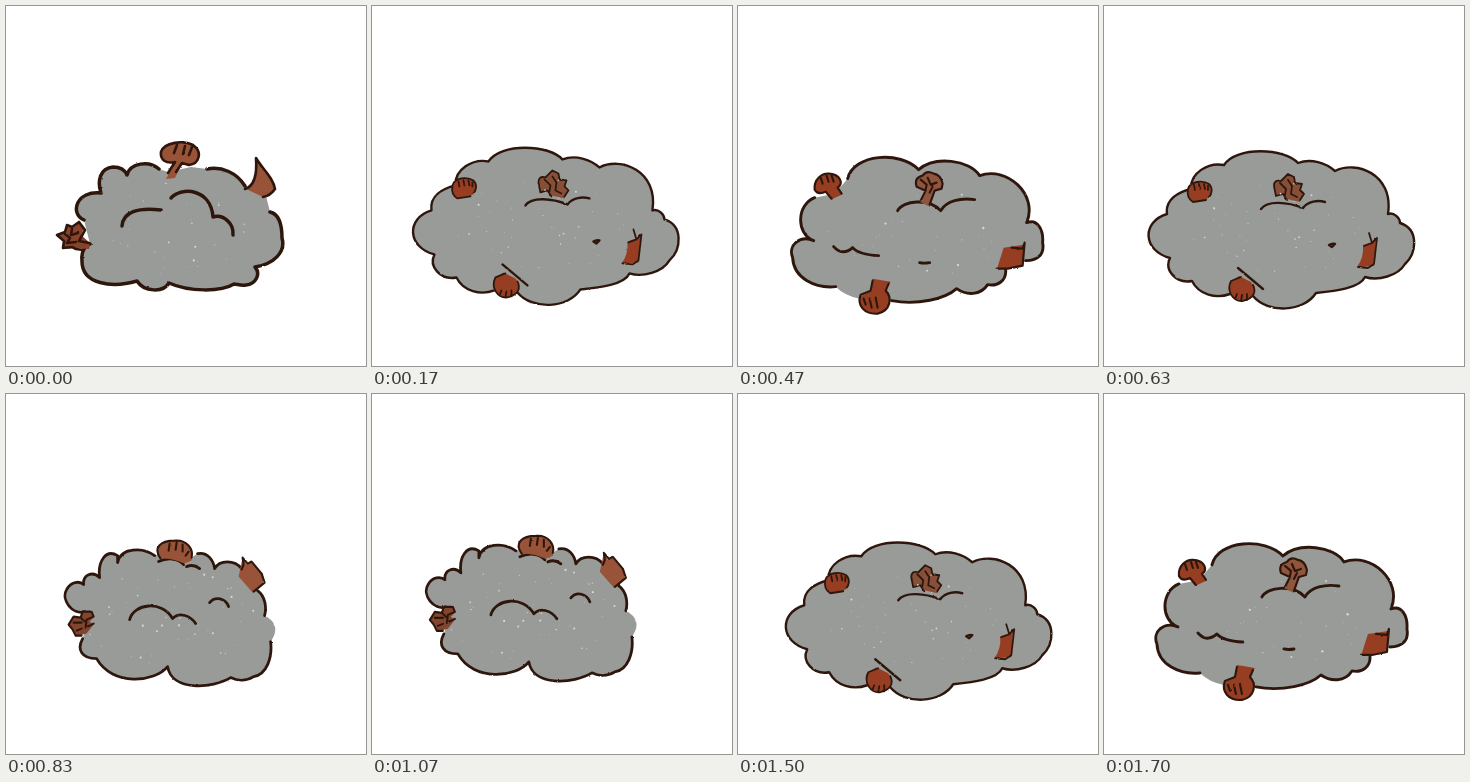
Animation, 360 px wide and 360 px high, one loop 1730 ms. Source, as an HTML page:

```html
<!DOCTYPE html>
<html lang="en">
<head>
<meta charset="utf-8">
<title>Scuffle cloud</title>
<style>
  html, body { margin: 0; width: 100%; height: 100%; overflow: hidden; background: #fff; }
  svg { display: block; width: 100vw; height: 100vh; }
  .ink { fill: none; stroke: #2f190f; stroke-linecap: round; stroke-linejoin: round; }
  .fog { fill: #989b98; }
  .dust { fill: #d5d9d6; }
</style>
</head>
<body>
<svg id="stage" viewBox="0 0 360 360">
  <filter id="rough" x="0" y="0" width="360" height="360" filterUnits="userSpaceOnUse">
    <feTurbulence type="fractalNoise" baseFrequency=".2" numOctaves="2" seed="4" result="noise"/>
    <feDisplacementMap in="SourceGraphic" in2="noise" scale="1.7" xChannelSelector="R" yChannelSelector="G"/>
  </filter>
</svg>
<script>
const LOOP = 1730, SWING = 7.6, SHAKE_RATE = 8 / 71, SWAP_RATE = .27;

// until: end of the pose within one cycle; home and lag: rest offset and phase of its shake.
// edge: pieces of the cloud border, joined in order; a leading "-" leaves a piece without ink.
// limbs: [filled shape, ink lines, own colour].
const poses = [
  {
    until: .1, home: 7.6, lag: .627, width: 3.5, skin: '#985337', dust: 30, center: [176, 224],
    start: '95 187',
    edge: [
      'C91 175 94 162 107 161 C115 161 119 164 121 169 C124 157 143 154 153 163',
      '-L162 166 L185 161 L201 163',
      'C216 160 231 167 239 180',
      '-L260 190 L264 206',
      'C273 208 276 220 276 232 C280 246 268 258 249 261 C255 268 250 278 240 279 C235 280 231 278 228 278 C215 286 183 286 163 277 C157 287 138 286 131 275 C107 282 75 279 76 254 C75 246 78 241 84 238',
      '-L78 214',
      'C63 207 71 184 95 187'
    ],
    lines: 'M116 220C117 206 132 201 155 204M165 192C176 180 205 183 207 211C217 208 228 217 227 229',
    limbs: [
      ['M160 173L169 156C160 158 154 154 155 146C158 136 178 134 187 139C197 146 193 158 183 159L176 157L169 172Z',
       'M162 167L169 156C160 158 154 154 155 146C158 136 178 134 187 139C197 146 193 158 183 159L176 157L170 166M171 139L168 147M179 140L177 148M186 141L183 149'],
      ['M250 152C257 164 267 171 269 183Q264 192 257 191L238 182Q252 179 250 152Z',
       'M239 183Q252 179 250 152C257 164 267 171 269 183Q264 190 257 191'],
      ['M51 229L58 226L61 219L66 222L73 216L78 222L75 229L84 237L83 243L68 242L58 243L58 236Z',
       'M83 237L73 235L79 224L73 216L66 221L61 219L59 226L51 229L58 235L57 242L66 241L70 243L77 244M59 228L64 232L61 237L70 236M66 223L65 229L72 227',
       '#8b4229']
    ]
  },
  {
    until: .38, home: 0, lag: .236, width: 2.4, skin: '#963e22', dust: 42, center: [176, 224],
    start: '87 183',
    edge: [
      'C86 167 104 156 120 159 C132 140 181 142 194 157 C207 152 222 157 231 165 C252 154 290 168 284 208 C290 206 296 212 296 217 C315 223 313 247 301 258 C294 270 274 275 261 271 C256 282 232 285 212 287 C200 306 164 308 149 290',
      '-L138 280 L126 288',
      'C112 293 95 289 88 275 C72 278 60 264 66 252 C39 245 37 216 63 208 C61 193 75 186 87 183'
    ],
    lines: 'M157 203C163 194 184 196 199 202C204 195 214 194 221 196M134 262Q146 272 159 283M225 239Q228 237 231 238L228 241Z',
    limbs: [
      ['M84 183C86 175 99 174 105 178C110 183 107 190 102 194L89 196C84 193 83 188 84 183Z',
       'M102 194L89 196C84 193 83 188 84 183C86 175 99 174 105 178C109 182 108 188 105 191M90 179L91 184M95 178L96 183M100 178L101 183M104 180L104 184'],
      ['M170 180Q170 173 177 175L184 168L190 171L191 177L198 178L196 184L200 188L196 196L183 193L179 188L172 190Z',
       'M183 194L179 188L172 190L170 180Q170 173 177 175L184 168L190 171L191 177L198 178L196 184L200 188L196 194M176 177L182 183L181 189M184 174L188 180L187 188L193 191',
       '#875039'],
      ['M259 239L268 236L272 232L270 260L253 261Q260 252 259 239Z',
       'M265 227L268 237L260 240M268 237L273 232L270 258L264 262L254 261'],
      ['M126 276L135 270L147 276C153 283 149 291 144 294C132 298 123 289 125 280Z',
       'M137 271L127 275C122 285 129 296 139 295C151 292 152 285 149 279M131 293L133 288M137 295L138 289M143 294L143 288']
    ]
  },
  {
    until: .765, home: -7.6, lag: 0, width: 2.8, skin: '#985337', dust: 46, center: [176, 234],
    start: '104 194',
    edge: [
      'C102 178 110 165 122 172 L122 179 C125 164 147 163 159 172',
      '-L178 166 L196 174 L202 170',
      'C212 168 218 177 219 185 C224 176 239 176 246 185',
      '-L262 207',
      'C270 213 271 224 269 232',
      '-C282 239 282 248 275 258',
      'C277 274 271 291 258 293 C250 298 241 297 235 294 C217 305 176 308 172 283 C159 299 117 303 101 275 C86 275 81 266 87 255',
      '-L92 240 L89 228',
      'C77 232 65 216 71 206 C75 198 84 197 88 201 C87 191 97 187 104 194'
    ],
    lines: 'M134 236C138 220 166 216 177 235C184 228 195 232 200 240M214 219C220 212 230 215 233 223M163 178C171 174 182 174 188 181M191 183Q198 180 204 185',
    limbs: [
      ['M164 175C157 164 165 157 179 157C192 156 198 166 196 177L189 180Q176 174 164 175Z',
       'M165 175C157 164 165 157 179 157C192 156 198 166 196 174M174 160L173 167M181 159L180 166M187 161L187 168M193 168L190 172'],
      ['M247 174L251 181L255 177L267 190L269 199L257 209L243 193Z',
       'M246 186L248 181L247 174L252 180L256 178L266 190L269 199L258 208'],
      ['M73 241L78 233L85 234L87 228L96 228L98 234L94 238L98 241L91 250L80 253L77 246Z',
       'M86 252L80 252L77 246L73 241L78 233L85 234L87 228L96 228L98 233L91 236L90 244L98 240M78 239L86 239M85 234L89 238M81 247L86 245',
       '#83452f']
    ]
  },
  {
    until: .93, home: -5.6, lag: .5, width: 2.9, skin: '#963e22', dust: 26, center: [176, 224],
    start: '74 233',
    edge: [
      'C56 226 57 197 75 190',
      '-L95 186 L108 171',
      'C114 146 161 143 179 162 C195 148 230 152 240 168 C267 158 299 187 287 215 C298 211 304 222 303 235 C305 246 299 253 286 253',
      '-L266 262',
      'C267 273 258 279 248 277 C241 288 227 288 217 281 C206 291 178 298 152 293',
      '-L120 291 Q105 288 96 279',
      'C76 281 54 271 53 250 C48 238 60 227 74 233'
    ],
    lines: 'M158 203C163 193 189 190 201 203C207 193 221 190 235 192M94 239Q103 249 113 240Q119 247 139 248M180 255Q184 256 190 255',
    limbs: [
      ['M75 182C74 172 82 165 90 166C101 167 104 176 98 180L102 187L91 192L86 185Q78 188 75 182Z',
       'M92 191L86 184Q78 188 75 182C74 172 82 165 90 166C101 167 104 176 98 180L102 186M81 170L83 176M87 168L89 174M92 168L94 174'],
      ['M177 179Q174 170 183 168Q187 162 194 166Q201 167 203 176L202 181L195 184L190 199L180 194L186 183Z',
       'M181 193L186 183L177 179Q174 170 183 168Q187 162 194 166Q201 167 203 176L202 181L195 183L190 197M181 172L187 177L186 182M188 170L191 177L197 175M193 179L190 185',
       '#8f553d'],
      ['M264 240L284 237L283 258L257 262Z', 'M272 240L283 241L285 235L283 258L268 261L257 261'],
      ['M133 271L151 274L146 283C153 290 150 303 139 306C124 308 117 297 120 289L132 283Z',
       'M133 273L131 283L121 287C117 298 125 307 138 306C151 303 153 290 146 283L149 276M126 297L124 291M132 300L130 291M138 300L136 290']
    ]
  }
];

const svgNode = (parent, tag, attrs) => {
  const node = document.createElementNS('http://www.w3.org/2000/svg', tag);
  for (const key in attrs) node.setAttribute(key, attrs[key]);
  return parent.appendChild(node);
};

const seeded = seed => () => (seed = seed * 16807 % 2147483647) / 2147483647;

// Returns the fill path and the inked parts of the border.
function border(pose) {
  let at = pose.start, fill = 'M' + at, ink = '';
  for (const piece of pose.edge) {
    const bare = piece[0] === '-', d = bare ? piece.slice(1) : piece;
    if (!bare) ink += 'M' + at + d;
    fill += d;
    at = d.match(/[\d.]+ [\d.]+$/)[0];
  }
  return { fill, ink };
}

function draw(pose, index) {
  const group = svgNode(stage, 'g', {});
  const art = svgNode(group, 'g', { filter: 'url(#rough)' });
  const ink = (d, width) => svgNode(art, 'path', { class: 'ink', d, 'stroke-width': width });
  const { fill, ink: edge } = border(pose);
  svgNode(art, 'path', { class: 'fog', d: fill });
  ink(edge, pose.width);
  ink(pose.lines, pose.width);
  for (const [shape, lines, color = pose.skin] of pose.limbs) {
    svgNode(art, 'path', { d: shape, fill: color });
    ink(lines, pose.width * .75);
  }
  const random = seeded(911 + index * 577), [x, y] = pose.center;
  for (let i = 0; i < pose.dust; i++) {
    const angle = random() * 2 * Math.PI, reach = Math.sqrt(random());
    svgNode(group, 'circle', {
      class: 'dust',
      cx: x + 88 * reach * Math.cos(angle),
      cy: y + 48 * reach * Math.sin(angle),
      r: .4 + .8 * random() ** 3
    });
  }
  return group;
}

const stage = document.getElementById('stage');
const groups = poses.map(draw);

function render(now) {
  // 30 steps a second, each starting on a whole 10 ms
  const step = Math.floor((3 * Math.floor(now % LOOP / 10) + 1) / 10);
  const phase = step * SWAP_RATE % 1;
  const current = Math.max(0, poses.findIndex(pose => phase < pose.until));
  const { home, lag } = poses[current];
  const shift = home + SWING * Math.cos(2 * Math.PI * (SHAKE_RATE * (step - 10) + lag));
  groups.forEach((group, i) => group.setAttribute('visibility', i === current ? 'visible' : 'hidden'));
  groups[current].setAttribute('transform', `translate(${shift} ${shift})`);
}

const begin = performance.now();
function tick() {
  render(performance.now() - begin);
  requestAnimationFrame(tick);
}
tick();
</script>
</body>
</html>
```
